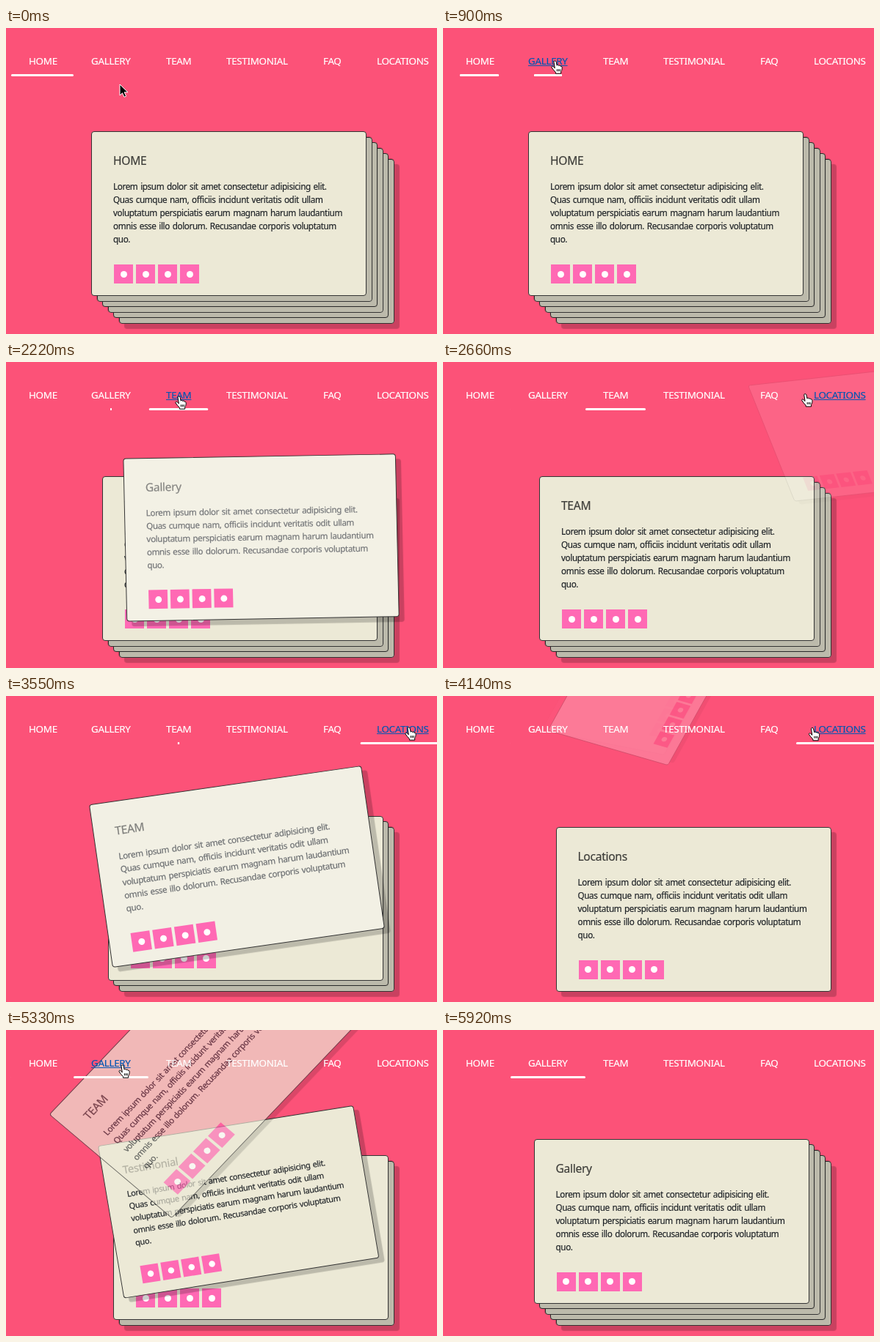
Write an HTML page that moves like this. It is 587x418 px and loops after 6.82 s.

```html
<!DOCTYPE html>
<html lang="en">
<head>
<meta charset="utf-8">
<title>Card stack menu</title>
<style>
  html, body { margin: 0; width: 100%; height: 100%; overflow: hidden; background: #fc5278; }
  #stage {
    position: relative; width: 587px; height: 418px; overflow: hidden;
    font-family: "Noto Sans", "Open Sans", sans-serif; white-space: nowrap;
    -webkit-text-stroke: .2px;
  }
  .nav { position: absolute; left: 0; top: 0; z-index: 10; }
  .link { position: absolute; top: 35px; font-size: 13.4px; line-height: 20px; letter-spacing: -.3px; color: #fff; }
  .link.hover { color: #0056b3; text-decoration: underline; }
  .bar { position: absolute; top: 63px; height: 3px; border-radius: 2px; background: #fff; }
  .card {
    position: absolute; width: 375px; height: 225px; box-sizing: border-box;
    border: 1px solid #333; border-radius: 4px;
    box-shadow: 7px 7px 1px rgba(0, 0, 0, .2);
  }
  .card > * { position: absolute; margin: 0; left: 29px; }
  h2 { top: 29px; font-size: 15.6px; line-height: 20px; font-weight: 400; letter-spacing: -.3px; }
  p { top: 65px; font-size: 11.7px; line-height: 18px; letter-spacing: -.38px; word-spacing: 1.1px; }
  .card i { top: 181px; width: 26px; height: 26px; background: #ff69b4; }
  .card i::after {
    content: ""; position: absolute; left: 8.5px; top: 8.5px; width: 9px; height: 9px;
    border-radius: 50%; background: #fff;
  }
  svg { position: absolute; left: 0; top: 0; overflow: visible; }
</style>
</head>
<body>
<div id="stage"></div>
<script>
const LOOP = 6820, STAGGER = 130;
const stage = document.getElementById('stage');

// card title and width of its menu entry
const ITEMS = [['HOME', 85], ['Gallery', 102], ['TEAM', 82], ['Testimonial', 132], ['FAQ', 73], ['Locations', 118]];
const LOREM = ['Lorem ipsum dolor sit amet consectetur adipisicing elit.',
  'Quas cumque nam, officiis incidunt veritatis odit ullam',
  'voluptatum perspiciatis earum magnam harum laudantium',
  'omnis esse illo dolorum. Recusandae corporis voluptatum', 'quo.'].join('<br>');

// time of the click and the chosen item
const VISITS = [[-1000, 0], [850, 1], [2024, 2], [3358, 5], [4987, 1]];
// pointer glides: from, to, x, y
const GLIDES = [[150, 450, 152, 46], [1340, 1790, 235, 48], [2380, 2737, 548, 44], [4070, 4738, 158, 49], [5330, 5770, 120, -30]];

const UP = { x: -40, y: -337, sway: 48, turn: 61, lean: 12.8, fade: 146 };
const RIGHT = { x: 277, y: -166, sway: 0, turn: 6.3, lean: 11.4, fade: 198 };
const REST = { x: 0, y: 0, turn: 0, lean: 0, scale: 1, alpha: 1, white: 0 };

const ramp = (t, a, b) => Math.min(1, Math.max(0, (t - a) / (b - a)));
const ease = (t, a, b) => { const u = ramp(t, a, b); return u * u * (3 - 2 * u); };

function leave(e, goal) {
  const move = ease(e, 140, 440);
  return {
    x: goal.x * move + goal.sway * Math.sin(Math.PI * ramp(e, 200, 530)),
    y: goal.y * move,
    turn: goal.turn * ease(e, 120, 470),
    lean: goal.lean * Math.max(0, e - 200) / 330,
    scale: 1 - .24 * ramp(e, 200, 400),
    alpha: Math.exp(-((Math.max(0, e - 350) / goal.fade) ** 2)),
    white: ramp(e, 125, 350)
  };
}

function enter(e) {
  const u = ramp(e, 0, 280), left = 1 - ease(e, 0, 280);
  return {
    x: -63 * left, y: -268 * left, turn: 58 * left, lean: 4 * left,
    scale: 1 - .43 * u * u * (1 - u), alpha: ramp(e, 0, 118), white: 0
  };
}

// Going forward throws the cards off the top; going back returns them in reverse order.
function poseOf(k, t) {
  let pose = REST;
  for (let n = 1; n < VISITS.length && VISITS[n][0] <= t; n++) {
    const from = VISITS[n - 1][1], [time, to] = VISITS[n], e = t - time;
    if (k >= from && k < to) pose = leave(e - STAGGER * (k - from), k === 1 ? RIGHT : UP);
    if (k >= to && k < from) pose = enter(e - STAGGER * (from - 1 - k));
  }
  return pose;
}

function add(tag, cls, html, parent = stage) {
  const el = document.createElement(tag);
  el.className = cls;
  el.innerHTML = html;
  parent.append(el);
  return el;
}

const nav = add('div', 'nav', '');
let edge = 7;
const menu = ITEMS.map(([title, width], k) => {
  const card = add('div', 'card', `<h2>${title}</h2><p>${LOREM}</p>`);
  for (let n = 0; n < 4; n++) add('i', '', '', card).style.left = 30 + 30 * n + 'px';
  card.style.left = 116 + 7.5 * k + 'px';
  card.style.top = 141 + 7.5 * k + 'px';
  card.style.zIndex = ITEMS.length - k;

  const link = add('div', 'link', title.toUpperCase(), nav), bar = add('div', 'bar', '', nav), left = edge;
  link.style.left = left + 24 + 'px';
  bar.style.left = left + 'px';
  bar.style.width = width + 'px';
  edge += width;
  return { card, link, bar, left, right: edge };
});

const svg = add('div', '', `<svg width="20" height="20" stroke-linejoin="round">
  <path id="arrow" d="M0 0V15L3.5 11.8L6 17.3L8.6 16.1L6.2 10.8H11Z" fill="#000" stroke="#fff"/>
  <path id="hand" transform="translate(0 -1)" d="M-1 1.2C-1-.6 1.8-.6 2.1 1.2L3.2 6.2C3.8 4.9 5.5 5.2 5.7 6.6
    C6.5 5.6 8 6 8.2 7.4C9.2 6.8 10.2 7.6 10.2 8.8C10.3 11.8 9.6 13 8.7 14.6V17.2H1.4V15.4C-.6 13.6-2.6 11-4 8.8
    C-4.6 7.4-2.8 6.7-1.8 7.8L.3 9.8ZM3.4 11.2V14.2M5.4 11.2V14.2M7.3 11.2V14.2" fill="#fff" stroke="#000"/>
</svg>`, nav).firstChild;
const [arrow, hand] = svg.children;

const mix = (a, f) => `rgb(${a.map(v => Math.round(v + (255 - v) * f))})`;

function drawCard(el, { x, y, turn, lean, scale, alpha, white }) {
  const a = turn * Math.PI / 180, b = (turn + lean) * Math.PI / 180;
  const m = [Math.cos(a), -Math.sin(a), Math.sin(b), Math.cos(b)].map(v => v * scale);
  el.style.transform = alpha === 1 && !y ? 'none' : `matrix(${[...m, x, y].map(v => v.toFixed(4))})`;
  el.style.opacity = alpha.toFixed(3);
  el.style.background = mix([236, 233, 214], white);
  el.children[0].style.color = mix([62, 62, 58], white);
  el.children[1].style.color = mix([33, 37, 41], white);
}

function drawBars(t) {
  const n = VISITS.filter(([time]) => time <= t).length - 1;
  const [time, now] = VISITS[n], before = n && VISITS[n - 1][1];
  const grow = 1 - (1 - ramp(t, time, time + 240)) ** 2;
  menu.forEach(({ bar }, k) => {
    const size = k === now ? grow : k === before ? 1 - grow : 0;
    bar.style.transform = `scaleX(${size})`;
  });
}

function drawPointer(t) {
  let x = 155, y = 77;
  for (const [from, to, gx, gy] of GLIDES) {
    const f = ramp(t, from, to);
    x += (gx - x) * f;
    y += (gy - y) * f;
  }
  let over = false;
  for (const { link, left, right } of menu) {
    const hit = y > 24 && y < 66 && x >= left && x < right;
    link.classList.toggle('hover', hit);
    over = over || hit;
  }
  svg.style.transform = `translate(${x}px, ${y}px)`;
  arrow.style.display = over ? 'none' : '';
  hand.style.display = over ? '' : 'none';
}

// The motion is shown at about seven pictures a second.
function stepped(t) {
  if (t < 1182) return Math.floor(t / 150) * 150;
  return 1200 + Math.floor((t - 1182) / 147.4) * 147.4;
}

const start = performance.now();
function frame() {
  const t = stepped((performance.now() - start) % LOOP);
  menu.forEach(({ card }, k) => drawCard(card, poseOf(k, t)));
  drawBars(t);
  drawPointer(t);
  requestAnimationFrame(frame);
}
frame();
</script>
</body>
</html>
```
